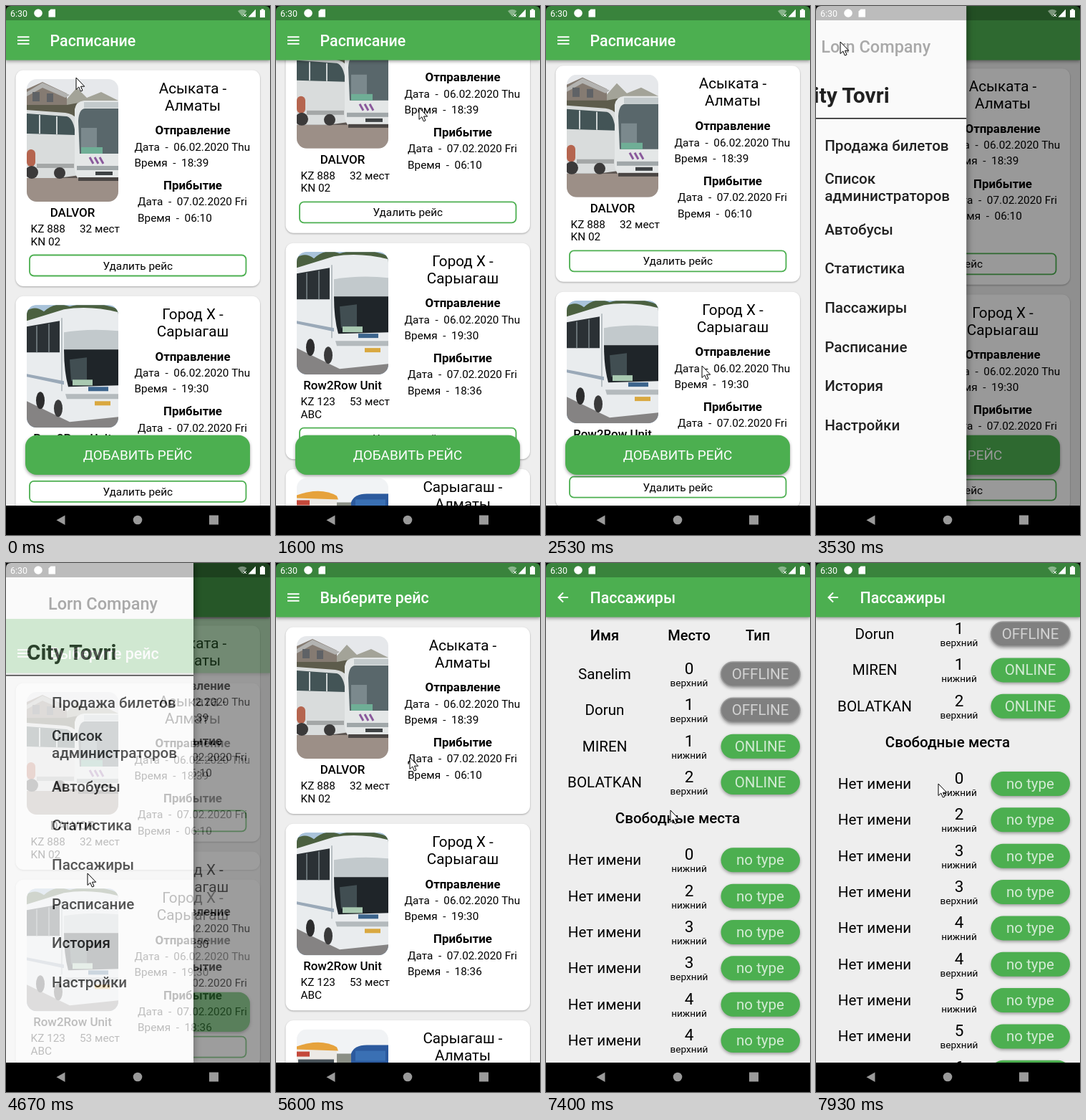
These frames come from a looping animation (369 by 738 pixels, 8000 ms). An HTML page:

```html
<!DOCTYPE html>
<html lang="ru">
<head>
<meta charset="utf-8">
<title>Расписание</title>
<style>
html, body { margin: 0; width: 100%; height: 100%; overflow: hidden; background: #000; }
svg { display: block; width: 369px; height: 738px; font-family: Roboto, "Noto Sans", sans-serif; }
.m { text-anchor: middle; }
.med { font-weight: 500; }
.bold { font-weight: 700; }
.card { fill: #fff; filter: drop-shadow(0 1px 1px rgba(0,0,0,.3)); }
.raised { filter: drop-shadow(0 2px 2px rgba(0,0,0,.35)); }
</style>
</head>
<body>
<svg id="stage" viewBox="0 0 369 738" xmlns="http://www.w3.org/2000/svg"></svg>
<script>
const LOOP = 8000, GREEN = '#4caf50', DRAWER = 262;

const rect = (x, y, w, h, fill, more = '') =>
  `<rect x="${x}" y="${y}" width="${w}" height="${h}" fill="${fill}" ${more}/>`;
const path = (d, fill, more = '') => `<path d="${d}" fill="${fill}" ${more}/>`;
const text = (x, y, size, str, cls = '', fill = '#000') =>
  `<text x="${x}" y="${y}" font-size="${size}" class="${cls}" fill="${fill}">${str.replace(/  /g, '\u00a0\u00a0')}</text>`;

// Simplified bus pictures, 128 x 171 each
const photos = [
  rect(0, 0, 128, 171, '#e6e8eb') +
  path('M54 30L70 12L84 26L104 18L128 30V60H54Z', '#a3a398') +
  path('M0 14L22 4L56 20V62H0Z', '#857b72') + path('M0 18L22 5L60 22L54 26L22 12L0 24Z', '#b3b3b1') +
  rect(8, 18, 10, 13, '#5f6266') + rect(28, 20, 9, 12, '#5f6266') +
  path('M0 36H56L78 32V60H0Z', '#5d5c4c') +
  rect(0, 134, 128, 37, '#9c8f87') + rect(0, 128, 128, 10, '#5d5652') +
  path('M0 43L54 47Q74 50 74 70V134L44 138H0Z', '#d9dcdc') +
  path('M0 48L56 52Q66 55 68 78L0 76Z', '#435456') + path('M18 50V76M42 52V77', 'none', 'stroke="#cfd5d5" stroke-width="2"') +
  rect(0, 98, 12, 24, '#b5654f', 'rx="6"') + rect(14, 118, 52, 6, '#a4a7a7') +
  '<circle cx="7" cy="130" r="9" fill="#3b3a3a"/><circle cx="46" cy="131" r="8" fill="#3b3a3a"/>' +
  path('M67 42Q69 31 80 30H128V141H76Q67 138 67 122Z', '#e4e7e7') +
  path('M72 58Q73 42 81 41H128V104H74Z', '#59676b') + rect(80, 32, 48, 8, '#c3cacc') +
  path('M76 68H98V100H76Z', '#7b898d') + rect(76, 95, 30, 9, '#6fae96') +
  path('M88 109l5 9M95 109l5 9M102 109l5 9', 'none', 'stroke="#8a5a9c" stroke-width="3"') +
  rect(70, 121, 58, 6, '#a0a7a9') + rect(96, 129, 24, 5, '#3e4244') + rect(72, 137, 56, 5, '#4a4644'),

  rect(0, 0, 128, 171, '#7fa9d3') + path('M0 0H128V26H0Z', '#a9c3da') +
  path('M0 8Q12 0 24 9Q40 -6 60 2Q96 -8 128 6V50H0Z', '#4b6040') +
  rect(0, 120, 128, 51, '#858383') + path('M0 108H30V128H0Z', '#6b7d4e') +
  path('M0 22L52 6Q88 0 128 10V156L60 163L0 134Z', '#e9ecee') +
  path('M0 30L46 22V66L0 66Z', '#2b3135') + path('M14 29V66M31 26V66', 'none', 'stroke="#7d878b" stroke-width="1.5"') +
  path('M52 38Q88 32 128 36V64H52Z', '#c2c9cc') + path('M49 18V120', 'none', 'stroke="#b9c0c4" stroke-width="2"') +
  path('M52 62H128V112L58 114Q52 92 52 62Z', '#1f2529') +
  path('M60 76L84 73V106H62Z', '#414e52') + rect(64, 104, 28, 8, '#a9c9b1') +
  path('M0 96L52 106V111L0 100Z', '#9aa9b8') + rect(86, 114, 28, 6, '#3c648c') +
  path('M54 124H128V131H56Z', '#b4babd') + rect(95, 134, 22, 6, '#d9a840') +
  '<ellipse cx="19" cy="133" rx="6" ry="12" fill="#2c2c2d"/><ellipse cx="44" cy="144" rx="6" ry="12" fill="#3a3a3b"/>',

  rect(0, 0, 128, 171, '#f1f3f5') + path('M56 34H80V171H56Z', '#8b8f86') + rect(0, 140, 128, 31, '#8d8a87') +
  path('M0 24Q34 12 56 25V150H0Z', '#eceae6') + path('M0 24Q34 12 56 25L58 30L0 28Z', '#e6a23c') +
  rect(0, 31, 18, 7, '#c4493b') + path('M2 42H52V92H2Z', '#475158') + rect(0, 104, 56, 10, '#d98b34') +
  path('M76 34Q80 22 98 22H128V150H76Z', '#2c5a9e') + rect(82, 30, 42, 14, '#3a70b4') +
  path('M82 50H128V98H82Z', '#39444d') + rect(78, 106, 50, 12, '#dfe5ea')
];

const trips = [
  ['Асыката -', 'Алматы', '18:39', '06:10', 'DALVOR', 'KZ 888', 'KN 02', '32 мест'],
  ['Город Х -', 'Сарыагаш', '19:30', '18:36', 'Row2Row Unit', 'KZ 123', 'ABC', '53 мест'],
  ['Сарыагаш -', 'Алматы', '20:00', '07:15', 'DALVOR', 'KZ 456', 'KN 02', '40 мест']
];

function card(i, withDelete) {
  const [from, to, start, end, bus, plate, plate2, seats] = trips[i];
  const y = 89.5 + i * (withDelete ? 315.3 : 274.3), S = 15.35;
  return `<g transform="translate(0 ${y})">` +
    rect(13.5, 0, 341.5, withDelete ? 301.5 : 260.5, '#fff', 'rx="11" class="card"') +
    `<g transform="translate(29 12.5)" clip-path="url(#round)">${photos[i]}</g>` +
    text(261, 32, 20.7, from, 'm') + text(261, 56, 20.7, to, 'm') +
    text(261, 89.8, 16.9, 'Отправление', 'm bold') +
    text(179.5, 112.2, S, 'Дата  -  06.02.2020 Thu') + text(179.5, 134.2, S, 'Время  -  ' + start) +
    text(261, 166.7, 16.9, 'Прибытие', 'm bold') +
    text(184, 188.8, S, 'Дата  -  07.02.2020 Fri') + text(184, 211.2, S, 'Время  -  ' + end) +
    text(93, 204.5, 16.9, bus, 'm med') +
    text(34.5, 226.5, S, plate) + text(34.5, 244, S, plate2) + text(103, 226.5, S, seats) +
    (withDelete ? rect(33, 258, 302.5, 29, '#fff', `rx="6" stroke="${GREEN}" stroke-width="1.8"`) +
      text(184.3, 278, S, 'Удалить рейс', 'm') : '') + '</g>';
}

function passengers() {
  const free = 'Нет имени';
  const rows = [['Sanelim', 0, 1, 'OFFLINE'], ['Dorun', 1, 1, 'OFFLINE'], ['MIREN', 1, 0, 'ONLINE'], ['BOLATKAN', 2, 1, 'ONLINE'],
    [free, 0, 0], [free, 2, 0]];
  for (let n = 3; n < 8; n++) rows.push([free, n, 0], [free, n, 1]);
  return text(82, 108, 20, 'Имя', 'm med') + text(200, 108, 20, 'Место', 'm med') + text(296, 108, 20, 'Тип', 'm med') +
    text(184, 363.3, 20.5, 'Свободные места', 'm med') +
    rows.map(([name, seat, upper, type = 'no type'], i) => {
      const y = i < 4 ? 155 + i * 50.35 : 414.3 + (i - 4) * 50.35, off = type === 'OFFLINE';
      return text(82, y + 7, 20.6, name, 'm') + text(200, y, 22.5, '' + seat, 'm') +
        text(200, y + 17, 13.6, upper ? 'верхний' : 'нижний', 'm') +
        rect(244.5, y - 17, 110.5, 34, off ? '#808080' : GREEN,
          'rx="17" class="raised"' + (off ? ' stroke="#999" stroke-width="1.5"' : '')) +
        text(299.5, y + 7, 20.5, type, 'm', off ? '#d2d2d2' : '#d3ebd4');
    }).join('');
}

const burger = path('M16 43.3H32.5M16 48H32.5M16 52.7H32.5', 'none', 'stroke="#fff" stroke-width="1.9"');
const back = path('M31 48H18M24 41.5L17.5 48L24 54.5', 'none', 'stroke="#fff" stroke-width="2"');

const page = (id, title, icon, list, extra = '') => `<g id="${id}">` + rect(0, 0, 369, 697, '#eee') +
  `<g id="${id}List">${list}</g>` + extra +
  rect(0, 0, 369, 75.5, GREEN, 'class="raised"') + icon + text(61.5, 55.5, 21.4, title, 'med', '#fff') + '</g>';

const cards = del => trips.map((_, i) => card(i, del)).join('');

const addButton = rect(27, 598.7, 314, 55.3, GREEN, 'rx="16" class="raised"') +
  text(184, 632.7, 18.9, 'ДОБАВИТЬ РЕЙС', 'm', '#fff');

const menu = [['Продажа билетов', 202], ['Список', 248], ['администраторов', 272], ['Автобусы', 318.5], ['Статистика', 373],
  ['Пассажиры', 428], ['Расписание', 482.5], ['История', 537], ['Настройки', 591.5]];

const drawer = '<g id="drawer">' + rect(0, 0, DRAWER, 697, '#fafafa', 'style="filter:drop-shadow(1px 0 5px rgba(0,0,0,.5))"') +
  text(59, 65, 23.5, 'Lorn Company', 'med', '#a9a9a9') +
  `<text x="154.5" y="134.5" font-size="30" text-anchor="end" class="bold" fill="#212121">City Tovri</text>` +
  rect(0, 156, DRAWER, 1.6, '#222') +
  menu.map(([s, y]) => text(64, y, 20.6, s, 'med', '#222')).join('') + '</g>';

const statusBar = rect(0, 0, 369, 20, '#000', 'opacity=".25"') + text(6, 14.5, 12.4, '6:30', '', '#fff') +
  '<circle cx="45" cy="10" r="5.8" fill="#fff"/>' +
  path('M62.5 4.5H69V15.5H59.5V7.5Z', '#fff') +
  path('M324 7Q330 2.5 336.5 7L330.5 15Z', '#fff', 'opacity=".4"') + path('M332 11l4 4m0 -4l-4 4', 'none', 'stroke="#fff"') +
  path('M349 4.5V15.5H338.5Z', '#fff') + path('M355 5.5H357V4H360V5.5H362V16H355Z', '#fff') +
  path('M0 0H7Q0 0 0 7ZM369 0H362Q369 0 369 7Z', '#000');

const navBar = rect(0, 697, 369, 41, '#000') + path('M82.5 710.5V724L70.5 717.2Z', '#9a9a9a') +
  '<circle cx="184" cy="717" r="6.3" fill="#9a9a9a"/>' + rect(284, 710.5, 13, 13, '#9a9a9a');

const stage = document.getElementById('stage');
stage.innerHTML = '<defs><clipPath id="round"><rect width="128" height="171" rx="14"/></clipPath></defs>' +
  page('plan', 'Расписание', burger, cards(true), addButton) +
  rect(0, 0, 369, 697, '#000', 'id="scrim"') + drawer +
  page('pick', 'Выберите рейс', burger, cards(false)) +
  page('people', 'Пассажиры', back, passengers()) +
  statusBar + navBar +
  path('M0 0V16.5L3.8 13L6.3 19L9 17.9L6.5 12.2H11.7Z', '#fff', 'id="cursor" stroke="#000" stroke-width="1" stroke-linejoin="round"');

const el = id => document.getElementById(id);
const move = (id, x, y) => el(id).setAttribute('transform', `translate(${x.toFixed(2)} ${y.toFixed(2)})`);
const clamp = u => Math.max(0, Math.min(1, u));
const easeOut = u => 1 - (1 - clamp(u)) ** 2;

// Keys are [time, value, ...], linear in between
function track(keys, t) {
  const i = keys.findIndex(k => k[0] > t);
  if (i === 0) return keys[0].slice(1);
  if (i < 0) return keys[keys.length - 1].slice(1);
  const a = keys[i - 1], b = keys[i], u = (t - a[0]) / (b[0] - a[0]);
  return a.slice(1).map((v, n) => v + (b[n + 1] - v) * u);
}

const pointer = [[80, 98, 100], [530, 200, 323], [680, 200, 323], [930, 147, 262], [1130, 200, 218], [1250, 200, 218],
  [1600, 200, 142], [1800, 203, 110], [2070, 214, 358], [2110, 214, 358], [2530, 218, 502], [2600, 218, 502],
  [2930, 15, 45], [2960, 15, 45], [3000, 34, 50], [3680, 34, 50], [4200, 114, 430], [4640, 114, 430], [4870, 114, 452],
  [5290, 114, 452], [5600, 187, 271], [7090, 187, 271], [7400, 174, 345], [7930, 171, 308]];
const planScroll = [[1250, 0], [1600, 74], [1800, 108], [1950, 140], [2070, 150], [2110, 150], [2530, 6.2], [2660, 2.2]];

// New page fades in while rising
function enter(id, t, start, span) {
  const u = clamp((t - start) / span);
  el(id).style.display = u > 0 ? '' : 'none';
  el(id).setAttribute('opacity', u.toFixed(3));
  move(id, 0, 174 * (1 - u) ** 3);
}

function draw(t) {
  const open = easeOut((t - 3370) / 290);
  move('planList', 0, -track(planScroll, t)[0]);
  el('drawer').style.display = open > 0 ? '' : 'none';
  move('drawer', DRAWER * (open - 1), 0);
  el('scrim').setAttribute('opacity', (open * .5).toFixed(3));
  enter('pick', t, 4610, 260);
  enter('people', t, 6540, 190);
  move('peopleList', 0, -106.3 * easeOut((t - 7420) / 510));
  move('cursor', ...track(pointer, t));
}

function tick() {
  draw(performance.now() % LOOP);
  requestAnimationFrame(tick);
}
tick();
</script>
</body>
</html>
```
